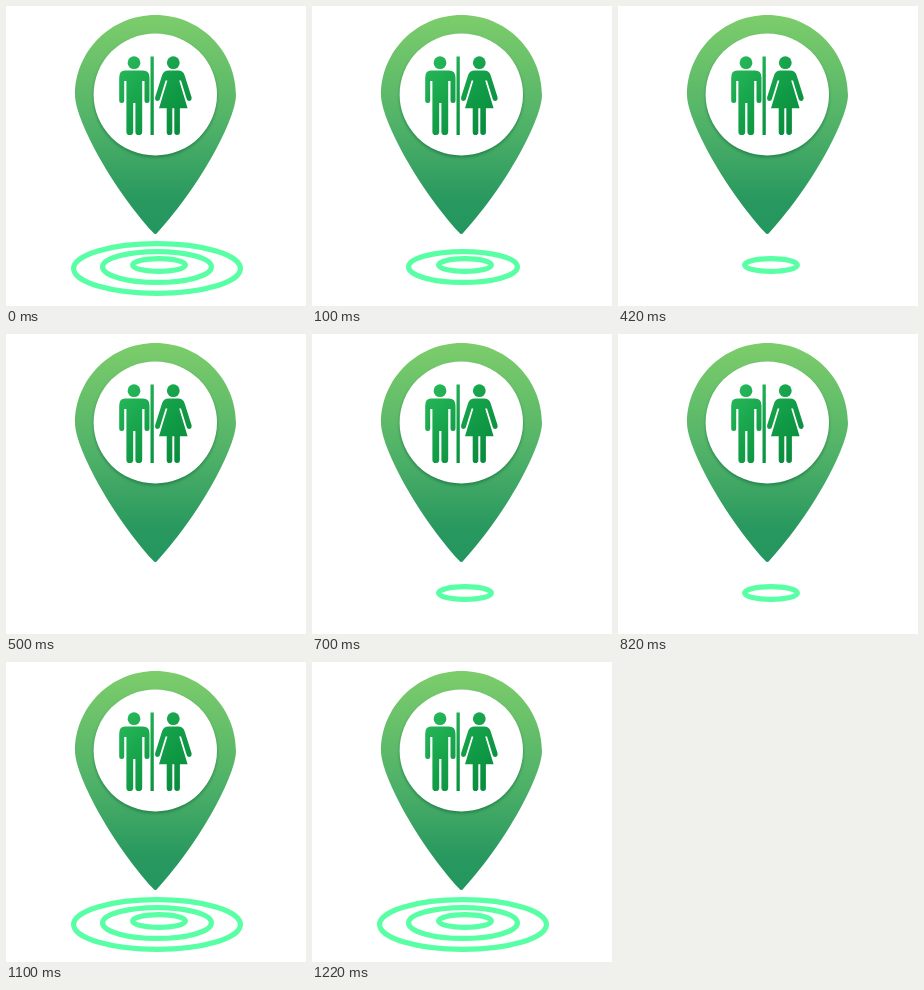
Animation of 300x300 px, one loop 1.3 s. Source, as an HTML page:

```html
<!DOCTYPE html>
<html lang="en">
<head>
<meta charset="utf-8">
<title>Restroom pin</title>
<style>
  html, body { margin: 0; width: 100%; height: 100%; overflow: hidden; background: #fff; }
  svg { display: block; width: 100vw; height: 100vh; }
  .ring { fill: none; stroke: #58ffa4; stroke-width: 5.2; }
</style>
</head>
<body>
<svg viewBox="0 0 300 300">
  <defs>
    <linearGradient id="green" gradientUnits="userSpaceOnUse" x1="0" y1="9" x2="0" y2="228">
      <stop offset="0" stop-color="#7dcd6b"/>
      <stop offset=".5" stop-color="#50b268"/>
      <stop offset=".85" stop-color="#28985f"/>
      <stop offset="1" stop-color="#23965f"/>
    </linearGradient>
    <linearGradient id="figure" gradientUnits="userSpaceOnUse" x1="113" y1="52" x2="184" y2="122">
      <stop offset="0" stop-color="#29bb5b"/>
      <stop offset=".5" stop-color="#14a049"/>
      <stop offset="1" stop-color="#078a3c"/>
    </linearGradient>
    <filter id="soft" x="-20%" y="-20%" width="140%" height="140%">
      <feGaussianBlur stdDeviation="1.6"/>
    </filter>
  </defs>

  <ellipse class="ring" cx="151" cy="262.5" rx="83.4" ry="24.9"/>
  <ellipse class="ring" cx="151" cy="261" rx="54.4" ry="15.4"/>
  <ellipse class="ring" cx="153" cy="259" rx="26.4" ry="6.4"/>

  <path fill="url(#green)" d="M149.5 9C194 9 230 45 230 89C230 112 196 178 151.500 226.500Q149.300 229.500 147.100 226.500C103 178 69 112 69 89C69 45 105 9 149.500 9Z"/>
  <ellipse cx="149.300" cy="90.300" rx="61.700" ry="61" fill="#0b5a35" opacity=".5" filter="url(#soft)"/>
  <ellipse cx="149.300" cy="88.500" rx="61.700" ry="61" fill="#fff"/>

  <g fill="url(#figure)">
    <circle cx="128" cy="56.700" r="6.400"/>
    <path d="M119 64.500H137Q143.500 64.500 143.500 71.500V94.500A2.500 2.500 0 0 1 138.500 94.500V75H136.200V125.700A3.400 3.400 0 0 1 129.400 125.700V97H127.200V125.700A3.400 3.400 0 0 1 120.400 125.700V75H118.200V94.500A2.500 2.500 0 0 1 113.200 94.500V71.500Q113.200 64.500 119 64.500Z"/>
    <rect x="144.500" y="50.500" width="3.300" height="78.500"/>
    <circle cx="167.300" cy="56.700" r="6.400"/>
    <path d="M162.500 64.500H172.200Q177.200 64.500 178.700 69.500L185.500 91C186.500 95 182 96.500 180.700 93L175 74.500H173.200L181.600 102.300H173.900V126.200A2.800 2.800 0 0 1 168.300 126.200V102.300H166.300V126.200A2.800 2.800 0 0 1 160.700 126.200V102.300H153L161.400 74.500H159.600L153.900 93C152.600 96.500 148.100 95 149.200 91L156 69.500Q157.500 64.500 162.500 64.500Z"/>
  </g>
</svg>
<script>
  const LOOP = 1300;
  // When each ring hides and returns, outermost first
  const gaps = [[100, 1100], [300, 900], [500, 700]];
  const rings = document.querySelectorAll(".ring");

  function draw() {
    const t = performance.now() % LOOP;
    rings.forEach((ring, i) => {
      const [hide, show] = gaps[i];
      ring.style.visibility = t >= hide && t < show ? "hidden" : "visible";
    });
    requestAnimationFrame(draw);
  }
  draw();
</script>
</body>
</html>
```
